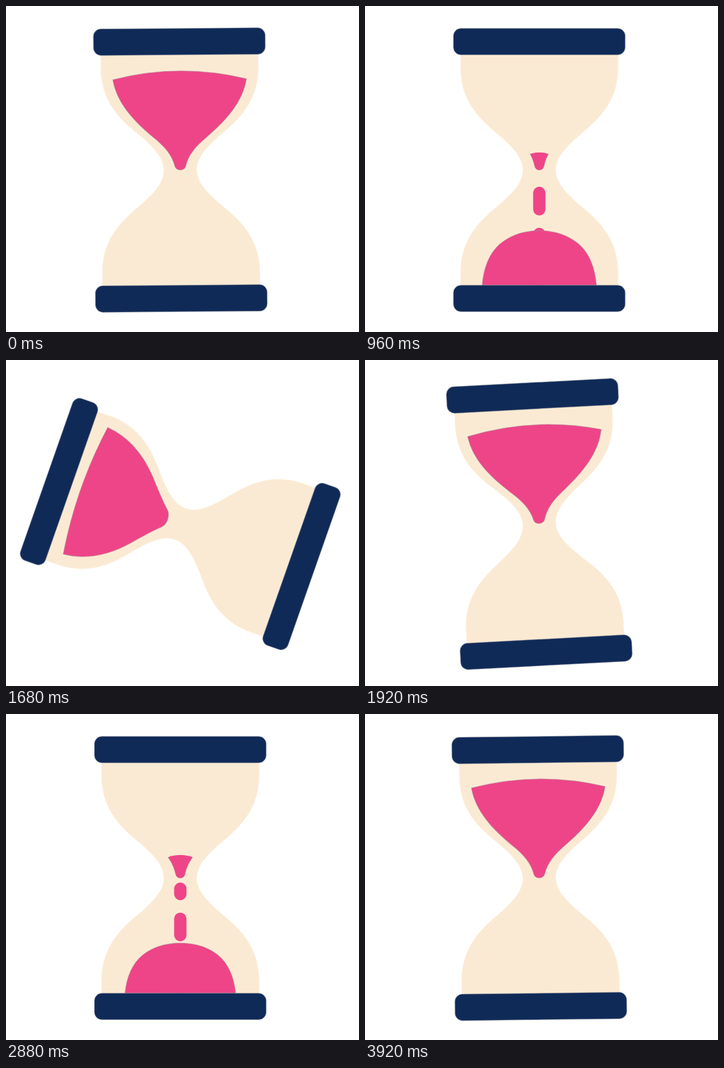
Recreate the animation shown at these times as an HTML page. Size 515x476 px, loop 4 s.

```html
<!DOCTYPE html>
<html lang="en">
<head>
<meta charset="utf-8">
<title>Hourglass</title>
<style>
  html, body { margin: 0; width: 100%; height: 100%; overflow: hidden; background: #fff; }
  svg { display: block; width: 100%; height: 100%; }
</style>
</head>
<body>
<svg viewBox="0 0 515 476">
  <defs>
    <clipPath id="level"><path id="levelPath"/></clipPath>
  </defs>
  <g id="glass">
    <path id="bulbs" fill="#fbead3"/>
    <g fill="#ee4588" stroke="#a08c96" stroke-opacity=".5">
      <g clip-path="url(#level)"><path id="upper"/></g>
      <path id="drops" stroke="none"/>
      <path id="lower"/>
    </g>
    <g fill="#102a58" stroke="#8a8f9a" stroke-opacity=".5">
      <rect x="-125.3" y="-206.8" width="250.6" height="38.6" rx="11"/>
      <rect x="-125.3" y="168.2" width="250.6" height="38.6" rx="11"/>
    </g>
  </g>
</svg>
<script>
const LOOP = 4000, STEP = 80;
const SPINS = [-574, 1397, 3354], SPIN = 607;
const FLOOR = 168, NECK = 6.5;

// Left half of a sand outline from corner to tip; the last pair bends the base.
const DOME = [[-99, 168.5], [-99.5, 130], [-89, 98], [-70, 79], [-57, 66], [-40, 55.5],
  [-20, 52], [-14, 50.7], [-7, 50], [0, 50], [0, 168]];
const FUNNEL = [[-97.5, 132.5], [-92, 98], [-66, 71], [-39, 48], [-22, 34], [-12, 22],
  [-8, 6], [-7, 2], [-4, 0], [0, 0], [0, 157]];

const $ = id => document.getElementById(id);
const clamp = v => Math.min(1, Math.max(0, v));
const mix = (a, b, k) => a + (b - a) * k;
const ramp = (t, from, to) => clamp((t - from) / (to - from));

function bezierEase(x, a, b) {
  let lo = 0, hi = 1;
  for (let i = 0; i < 30; i++) {
    const s = (lo + hi) / 2, r = 1 - s;
    if (3 * a * s * r * r + 3 * b * s * s * r + s * s * s < x) lo = s;
    else hi = s;
  }
  return lo * lo * (3 - 2 * lo);
}

function outline(pts) {
  const half = pts.slice(0, 10), base = pts[10];
  const back = half.slice(0, 9).reverse().map(([x, y]) => [-x, y]);
  return `M${half[0]}C${half.slice(1).concat(back).join(' ')}Q${base} ${half[0]}Z`;
}

const morph = k => outline(DOME.map(([x, y], i) =>
  [mix(x, FUNNEL[i][0], k), mix(y, FUNNEL[i][1], k)]));

// The heap starts as a low ellipse and fills out to the full dome.
function mound(k) {
  const w = mix(51, 99, k) / 99;
  return outline(DOME.map(([x, y]) => {
    const up = (FLOOR - y) / 118;
    const slim = 1 - 0.1 * (1 - k) * Math.sin(Math.PI * up);
    return [x * w * slim, FLOOR - up * 118 * k];
  }));
}

// Curved surface of the sinking sand, m being the height of its middle.
function surface(m) {
  const w = m < -100 ? mix(77, 97.5, (-100 - m) / 45)
    : m < -33.5 ? mix(18.5, 77, (-33.5 - m) / 66.5)
    : mix(3, 18.5, -m / 33.5);
  const bend = Math.min(12, w * 0.19) * 1.69, x = w * 1.3;
  return `M${-x} ${m + bend}Q0 ${m - bend} ${x} ${m + bend}V10H${-x}Z`;
}

function pill(top, bottom) {
  const r = Math.min(9, (bottom - top) / 2);
  return `M-9 ${top + r}a9 ${r} 0 0 1 18 0V${bottom - r}a9 ${r} 0 0 1 -18 0Z`;
}

// Pairs of drops leave the neck at a steady beat.
function stream(p) {
  let d = '';
  for (let i = 0; i < 10; i++) {
    const start = 115 + (i >> 1) * 210.6;
    const end = NECK + (p - start) * 0.665 - (i % 2) * 60;
    const top = Math.max(NECK, end - 42), bottom = Math.min(FLOOR + 6, end);
    if (bottom - top > 2) d += pill(top, bottom);
  }
  return d;
}

function draw(t) {
  const start = SPINS.filter(s => s <= t).pop();
  const p = t - start - SPIN;
  let angle = 0, sunk = 1, lower = '', drops = '';
  if (p < 0) {
    const k = bezierEase((t - start) / SPIN, 0.42, 0.35);
    angle = 180 * k;
    lower = morph(k);
  } else {
    sunk = (1 - Math.cos(Math.PI * ramp(p, 91, 1247))) / 2;
    const k = ramp(p, 297, 1233);
    if (k > 0) lower = mound(k);
    drops = stream(p);
  }
  const m = -145 * (1 - sunk);
  $('glass').setAttribute('transform', `translate(254.3 239.5) rotate(${angle})`);
  $('levelPath').setAttribute('d', m < -1 ? surface(m) : '');
  $('upper').setAttribute('transform', `scale(${1 - 0.17 * sunk} -1)`);
  $('lower').setAttribute('d', lower);
  $('drops').setAttribute('d', drops);
}

const side = (sx, sy) => [[-115, -150], [-115, -108], [-95, -81], [-66, -57],
  [-41, -36], [-24.5, -20], [-24, 0]].map(([x, y]) => [x * sx, y * sy]);
const curve = pts => `L${pts[0]}C${pts.slice(1).join(' ')}`;
$('bulbs').setAttribute('d', 'M-115 -170' + curve(side(1, 1)) +
  'C' + side(1, -1).reverse().slice(1).join(' ') + 'L-115 170H115' +
  curve(side(-1, -1)) + 'C' + side(-1, 1).reverse().slice(1).join(' ') + 'V-170Z');
$('upper').setAttribute('d', morph(1));

const origin = performance.now();
function tick() {
  const t = (performance.now() - origin) % LOOP;
  draw(Math.floor((t + 1) / STEP) * STEP % LOOP);
  requestAnimationFrame(tick);
}
tick();
</script>
</body>
</html>
```
